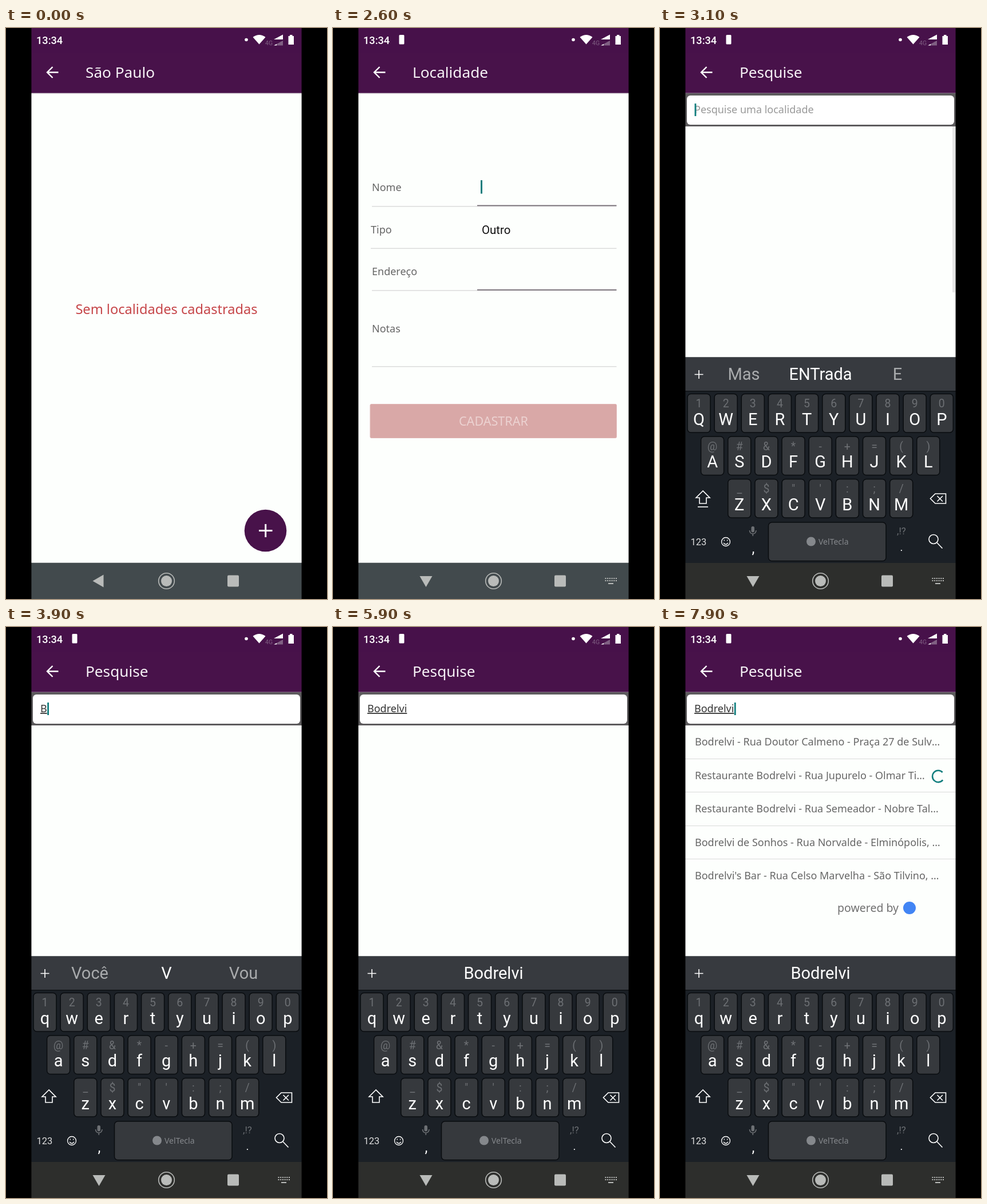
Animation of 561 by 998 pixels, one loop 8000 ms. Source, as an HTML page:

```html
<!DOCTYPE html>
<html lang="pt-BR">
<head>
<meta charset="utf-8">
<title>Pesquise</title>
<style>
  html, body { margin: 0; width: 100%; height: 100%; overflow: hidden; background: #000; }
  svg { display: block; width: 100%; height: 100%; }
  text, .row { font-family: "Noto Sans", sans-serif; white-space: pre; }
  .sys { font-family: Roboto, sans-serif; }
  .mid { text-anchor: middle; }
  .row {
    box-sizing: border-box; height: 58.5px; padding-left: 17px; line-height: 57px;
    font-size: 18px; color: #666; border-bottom: 1.5px solid #dadada;
  }
  .row:last-child { border: 0; }
  .row span { display: block; width: 434px; overflow: hidden; text-overflow: ellipsis; }
  .line { fill: none; stroke: #fff; stroke-width: 1.6; }
</style>
</head>
<body>
<svg id="stage" viewBox="0 0 561 998"></svg>
<script>
const LOOP = 8000;
const PURPLE = '#48124a', TEAL = '#117e7e', GREY = '#666';
const KEY = '#36393d', KEY_LIT = '#565a5f';

const rect = (x, y, w, h, fill, more = '') =>
  `<rect x="${x}" y="${y}" width="${w}" height="${h}" fill="${fill}" ${more}/>`;
const text = (x, y, size, fill, str, more = '') =>
  `<text x="${x}" y="${y}" font-size="${size}" fill="${fill}" ${more}>${str}</text>`;
const sys = (x, y, size, fill, str, more = '') =>
  text(x, y, size, fill, str, `class="sys mid" ${more}`);
const icon = (d, more = '') => `<path class="line" d="${d}" ${more}/>`;

const card = (id, title, body) => `<g id="${id}">
  ${rect(44, 44, 473, 891, '#fdfffd')}
  ${rect(44, 113.5, 473, 2, '#e3e1e3')}${rect(44, 44, 473, 69.7, PURPLE)}
  ${icon('M91.5 77.5H72.5M81.500 68L72 77.500L81.500 87', 'style="stroke-width:2.4"')}
  ${text(139, 87, 26.2, '#f6f2f6', title)}
  ${body}</g>`;

const home = () => text(280.5, 500, 23.6, '#c64649', 'Sem localidades cadastradas', 'class="mid" font-weight="500"') +
  `<circle id="fab" cx="453.500" cy="878.500" r="36.800" fill="${PURPLE}"/>` +
  icon('M442 878.500H465.500M453.700 867V890', 'style="stroke-width:3"');

const form = () => {
  const label = (x, y, str) => text(x, y, 18, GREY, str);
  const rule = (x, y, w) => rect(x, y, w, 1.5, '#dcdcdc');
  const field = y => rect(252, y, 243.5, 2, '#776f77');
  return label(68, 285, 'Nome') + rule(68, 311, 184) + field(309.5) +
    label(66, 359, 'Tipo') + rule(66, 384.5, 429.5) +
    text(260, 360, 20.4, '#111', 'Outro', 'class="sys"') +
    label(68, 432, 'Endereço') + rule(68, 458, 184) + field(456.8) +
    label(68, 532, 'Notas') + rule(68, 591, 427.5) +
    rect(65, 657.5, 430.5, 59, '#d9a8a7', 'rx="2" stroke="#dfb5b4"') +
    text(280.5, 695, 21.6, '#ecd2d1', 'CADASTRAR', 'class="mid" font-weight="500"') +
    rect(258, 266, 3, 23.5, TEAL, 'id="nameCaret"');
};

const PLACES = [
  'Bodrelvi - Rua Doutor Calmeno - Praça 27 de Sulvarim, Centro',
  'Restaurante Bodrelvi - Rua Jupurelo - Olmar Tibi, São Paulo',
  'Restaurante Bodrelvi - Rua Semeador - Nobre Talvena, Centro',
  'Bodrelvi de Sonhos - Rua Norvalde - Elminópolis, Manaus',
  "Bodrelvi's Bar - Rua Celso Marvelha - São Tilvino, Salvador"
];

const search = () => rect(44, 114, 473, 58, '#5d5b5d') +
  rect(47, 118, 467, 51, '#fff', 'rx="6"') +
  text(60, 149, 18, '#999', 'Pesquise uma localidade', 'id="hint"') +
  text(60, 149, 18, '#333', '', 'id="query" text-decoration="underline"') +
  rect(60, 132, 2.8, 22, TEAL, 'id="caret"') +
  rect(511, 172, 5, 290, '#e6e6e6', 'id="scrollbar"') +
  `<g id="results"><foreignObject x="44" y="172" width="473" height="296">
    ${PLACES.map(p => `<div class="row" xmlns="http://www.w3.org/1999/xhtml"><span>${p}</span></div>`).join('')}
  </foreignObject>
  ${text(310, 498, 19.5, '#707070', 'powered by')}<circle cx="436" cy="491" r="11" fill="#4285f4"/></g>
  <path id="spinner" fill="none" stroke="${TEAL}" stroke-width="2.600"/>`;

const ROWS = [
  { keys: 'qwertyuiop', hints: '1234567890', x: 68, y: 640 },
  { keys: 'asdfghjkl', hints: '@#&*-+=()', x: 91.6, y: 714.5 },
  { keys: 'zxcvbnm', hints: '_$"\':;/', x: 138.8, y: 789 }
];
const keyBox = (x, y, w, more = '') =>
  rect(x, y, w, 67.5, KEY, `rx="6" stroke="#090c0f" stroke-width="1.5" ${more}`);

const keyboard = () => {
  const keys = ROWS.map(({ keys, hints, x, y }) => [...keys].map((k, i) => {
    const cx = x + 47.15 * i;
    const hint = hints[i].replace('&', '&amp;');
    return keyBox(cx - 20, y - .5, 40, `id="key-${k}"`) +
      sys(cx, y + 23, 19.5, '#6d7074', hint) +
      sys(cx, y + 53.5, 29, '#fff', k, `data-key="${k}"`);
  }).join('')).join('');
  return `<g id="keyboard">
    ${rect(44, 575.5, 473, 359.5, '#1b2026')}${rect(44, 575.5, 473, 59.5, '#373a3f')}
    ${rect(44, 634, 473, 1.5, '#0f1215')}
    ${icon('M60.500 605.500H75.500M68 598V613')}
    <g id="words">${[146.5, 280.5, 415].map((x, i) => sys(x, 615, 29, i === 1 ? '#fff' : '#a9abad', '', `id="word${i}"`)).join('')}</g>
    ${keys}
    ${icon('M75 809L63 821H69V831H81V821H87Z')}
    ${icon('M66 837H84', 'id="shiftBar"')}
    ${icon('M481 814H499.500V831H481L472.500 822.500ZM484.500 818L494 827.500M494 818L484.500 827.500')}
    ${sys(67.5, 904, 16.5, '#ddd', '123')}
    <circle class="line" cx="115" cy="898" r="7.500" style="stroke-width:1.3"/>
    ${icon('M111 900Q115 905 119 900M112.300 894.500V896.500M117.700 894.500V896.500', 'style="stroke-width:1.3"')}
    ${rect(159.5, 871, 5.5, 10.5, '#6d7074', 'rx="2.700"')}
    ${icon('M156.500 878Q157 884 162.300 884Q167.500 884 168 878M162.300 884V888', 'style="stroke:#6d7074"')}
    ${sys(163, 918, 25, '#fff', ',')}
    ${keyBox(189.5, 864, 205.5)}
    <circle cx="264" cy="897.500" r="8" fill="#85888c"/>
    ${text(277, 902.5, 14, '#85888c', 'VelTecla')}
    ${sys(422, 885, 17, '#6d7074', ',!?')}${sys(422, 914, 19, '#fff', '.')}
    <circle class="line" cx="478" cy="893.500" r="8"/>${icon('M484 899.500L493.500 909.500')}
  </g>`;
};

const statusBar = () => rect(44, 0, 473, 44, '#47114a') +
  text(53, 28, 18.2, '#fff', '13:34', 'class="sys" font-weight="500"') +
  rect(115.5, 12, 9, 16.5, '#fff', 'id="notice" rx="1.500"') +
  `<circle cx="420" cy="20.500" r="2.800" fill="#fff"/>
   <path d="M431.500 16Q442.500 8 453.500 16L442.500 28.500Z" fill="#fff"/>
   ${text(453, 29.5, 10.5, '#806083', '4G', 'class="sys"')}
   <path d="M468 20L484 11.500V20ZM468 30.500L473 28V30.500Z" fill="#fff"/>
   <path d="M473 28L484 22V30.500H473Z" fill="#806083"/>
   <path d="M493.500 14H496V12H500.500V14H503V29H493.500Z" fill="#fff"/>`;

const navIcons = () => {
  let dots = rect(481, 970, 9, 2, '#b9bbb9');
  for (let i = 0; i < 12; i++) dots += rect(475.5 + i % 6 * 3.7, 961 + (i / 6 | 0) * 4, 2, 2, '#b9bbb9');
  return `<path id="back" fill="#b9bbb9"/>
     <circle cx="280.500" cy="966.500" r="13.800" fill="none" stroke="#b9bbb9" stroke-width="1.600"/>
     <circle cx="280.500" cy="966.500" r="9.500" fill="#b9bbb9"/>
     ${rect(387, 956.5, 20, 20, '#b9bbb9', 'rx="2"')}<g id="switcher">${dots}</g>`;
};

document.getElementById('stage').innerHTML =
  rect(0, 0, 561, 998, '#000') +
  card('home', 'São Paulo', home()) + card('form', 'Localidade', form()) +
  card('search', 'Pesquise', search()) +
  rect(44, 575.5, 473, 359.5, '#f6f7f6', 'id="resized"') +
  rect(44, 934.7, 473, 64, '#424a4d', 'id="navBack"') +
  keyboard() + navIcons() + statusBar() +
  rect(0, 0, 44.4, 998, '#000') + rect(516.6, 0, 45, 998, '#000');

const $ = id => document.getElementById(id);
const set = (id, attrs) => { for (const k in attrs) $(id).setAttribute(k, attrs[k]); };
const show = (id, on) => { $(id).style.display = on ? '' : 'none'; };
const put = (el, str) => { if (el.textContent !== str) el.textContent = str; };
const ramp = (t, from, to) => Math.min(1, Math.max(0, (t - from) / (to - from)));
const smooth = x => x * x * (3 - 2 * x);
const letters = [...document.querySelectorAll('[data-key]')];
const tappedRow = document.querySelectorAll('.row span')[1];

const PRESSES = [
  [3690, 'V'], [3790, 'B'], [4090, 'Bo'], [4240, 'Bod'], [4390, 'Bodr'],
  [4690, 'Bodre'], [4890, 'Bodrel'], [5090, 'Bodrelv'], [5270, 'Bodrelvi']
];
const lastPress = t => PRESSES.filter(([at]) => at <= t).pop() || [0, ''];
const SIDES = { '': ['Mas', 'E'], V: ['Você', 'Vou'], B: ['Bom', 'Boa'], Bo: ['Bom', 'Boa'] };

// Every part of a screen fades by itself, so overlapping parts shine through.
function placeCard(id, t, start) {
  const p = 1 - (1 - ramp(t, start, start + 350)) ** 5;
  const alpha = p < .5 ? p / 2 : p < .9 ? .25 + (p - .5) * 1.125 : .7 + (p - .9) * 3;
  show(id, p > 0);
  set(id, { transform: `translate(0 ${72 * (1 - p)})` });
  for (const part of $(id).children) part.setAttribute('opacity', alpha);
}

function drawSpinner(t) {
  show('spinner', t >= 7100);
  tappedRow.style.width = t >= 7100 ? '407px' : '';
  if (t < 7100) return;
  const u = (t - 7100) / 1333;
  const turn = -130 + 90 * u + 144 * u;
  const from = turn + 270 * smooth(ramp(u, .5, 1));
  const to = turn + 270 * smooth(ramp(u, 0, .5)) + 36;
  const point = deg => {
    const a = deg * Math.PI / 180;
    return `${486.3 + 10.2 * Math.cos(a)} ${261 + 10.2 * Math.sin(a)}`;
  };
  set('spinner', { d: `M${point(from)}A10.2 10.2 0 ${to - from > 180 ? 1 : 0} 1 ${point(to)}` });
}

function drawTyping(t) {
  const [at, typed] = lastPress(t);
  put($('query'), typed);
  show('hint', !typed);
  set('caret', { x: 60.5 + (typed ? $('query').getComputedTextLength() : 0) });
  const blinkedOff = [[3390, 3690], [5890, 6390], [6890, 7390]].some(([a, b]) => t >= a && t < b);
  show('caret', !blinkedOff);

  const pressed = t - at < 80 ? typed.slice(-1).toLowerCase() : '';
  for (const el of letters) {
    const k = el.dataset.key;
    put(el, typed ? k : k.toUpperCase());
    set('key-' + k, { fill: k === pressed ? KEY_LIT : KEY });
  }
  show('shiftBar', !typed);

  const offered = lastPress(t - 120)[1];
  const [left, right] = SIDES[offered] || ['', ''];
  [left, offered || 'ENTrada', right].forEach((w, i) => put($('word' + i), w));
}

function drawKeyboard(t) {
  const k = ramp(t, 2840, 3090);
  show('resized', k > 0);
  show('keyboard', k > 0);
  set('keyboard', { opacity: Math.min(1, 2.1 * k), transform: `translate(0 ${165 * (1 - k) ** 2})` });
  set('words', { opacity: .15 + .85 * ramp(t, 2900, 3090) });
  set('navBack', { fill: k === 0 ? '#424a4d' : k < 1 ? '#242e33' : '#2d2e2c' });
  const typing = t >= 2480;
  set('back', { d: typing ? 'M151.500 958H173.500L162.500 977Z' : 'M151.500 966.500L170.500 955.500V977.500Z' });
  show('switcher', typing);
}

function render(t) {
  set('notice', { opacity: ramp(t, 400, 600) });
  set('fab', { opacity: 1 - .5 * ramp(t, 1150, 1400) + .5 * ramp(t, 1610, 1860) });
  placeCard('form', t, 1690);
  placeCard('search', t, 2755);
  show('nameCaret', t >= 2480 && t < 2800);
  show('scrollbar', t < 3300);
  show('results', t >= 6090);
  drawTyping(t);
  drawSpinner(t);
  drawKeyboard(t);
}

const began = performance.now();
function tick() {
  render((performance.now() - began) % LOOP);
  requestAnimationFrame(tick);
}
tick();
</script>
</body>
</html>
```
